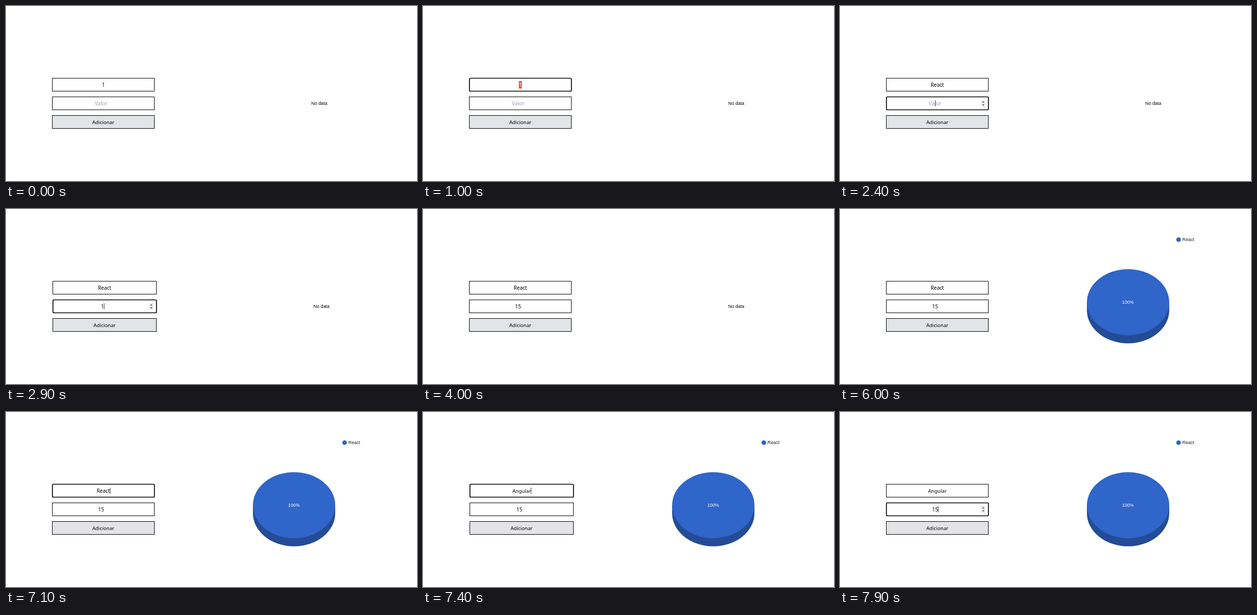
These frames come from a looping animation (794x338 px, 8 s). An HTML page:

```html
<!DOCTYPE html>
<html lang="pt">
<head>
<meta charset="utf-8">
<title>Gráfico</title>
<style>
  html, body { margin: 0; width: 100%; height: 100%; overflow: hidden; background: #fff; }
  svg { display: block; width: 794px; height: 338px; }
  .form text { font-family: "Noto Sans", "Open Sans", sans-serif; text-anchor: middle; }
  .chart text { font-family: "Liberation Sans", Arial, sans-serif; font-size: 8.8px; }
  .box { stroke: #000; fill: #fff; }
</style>
</head>
<body>
<svg viewBox="0 0 794 338">
  <g class="form">
    <rect class="box" id="box0"/>
    <rect class="box" id="box1"/>
    <rect class="box" id="box2" style="fill:#e3e4e8"/>
    <rect id="mark" fill="#e45434" y="145" height="14.4"/>
    <text id="text0" y="155.7"></text>
    <text id="text1" y="191.7"></text>
    <text id="text2" y="227.6"></text>
    <rect id="caret" width="0.8" height="12"/>
    <g id="spin">
      <rect x="272.5" y="181" width="8.5" height="14" fill="#efefef"/>
      <path d="M274.5 186.3h4.6l-2.3-2.6zM274.5 190h4.6l-2.3 2.6z" fill="#4a4a4a"/>
    </g>
  </g>
  <g class="chart" id="chart">
    <text id="empty" x="605.2" y="191" text-anchor="middle">No data</text>
    <g id="pie">
      <path d="M477 180v15.7a79.5 63.8 0 0 0 159 0v-15.7z" fill="#244c96"/>
      <ellipse cx="556.5" cy="180" rx="79.5" ry="63.8" fill="#3065c9"/>
      <text x="556.3" y="183.1" text-anchor="middle" fill="#fff">100%</text>
      <circle cx="654.1" cy="59.2" r="4.4" fill="#3065c9"/>
      <text x="661.3" y="62.3" fill="#222">React</text>
    </g>
  </g>
</svg>
<script>
const LOOP = 8000;
const SIZES = { Valor: 10.1, Adicionar: 9.6, Angular: 9.6 };
const el = id => document.getElementById(id);
const set = (node, attrs) => {
  for (const key in attrs) node.setAttribute(key, attrs[key]);
};

// Each step changes only the listed parts of the state.
const steps = [
  [0, { name: "1", value: "", focus: -1, caret: 0, mark: 0, spin: 0, wide: 0, pie: 0 }],
  [300, { spin: 1 }],
  [400, { spin: 0 }],
  [700, { focus: 0, caret: 1 }],
  [1000, { mark: 1, caret: 0 }],
  [1200, { name: "R", mark: 0, caret: 1 }],
  [1300, { name: "Rea" }],
  [1400, { name: "React" }],
  [1700, { caret: 0 }],
  [2400, { focus: 1, caret: 1, spin: 1 }],
  [2900, { value: "1", wide: 1 }],
  [3000, { wide: 0 }],
  [3500, { value: "15" }],
  [4000, { focus: -1, caret: 0, spin: 0 }],
  [4200, { pie: 1 }],
  [6300, { spin: 1 }],
  [6400, { spin: 0 }],
  [7100, { focus: 0, caret: 1 }],
  [7200, { mark: 1, caret: 0 }],
  [7400, { name: "Angular", mark: 0, caret: 1, wide: 1 }],
  [7500, { wide: 0 }],
  [7700, { caret: 0 }],
  [7900, { focus: 1, caret: 1, spin: 1 }]
];

function stateAt(time) {
  return Object.assign({}, ...steps.filter(s => s[0] <= time).map(s => s[1]));
}

function show(id, on) {
  el(id).setAttribute("visibility", on ? "visible" : "hidden");
}

function putText(i, text, x, fill) {
  const node = el("text" + i);
  if (node.textContent !== text) node.textContent = text;
  set(node, { x, fill, "font-size": SIZES[text] || 9.9 });
  return node.getComputedTextLength();
}

function draw(s) {
  const left = s.wide ? 90.5 : 89.5;
  const width = s.wide ? 200 : 197;
  const mid = left + width / 2;
  const numX = mid - 4.3;

  for (let i = 0; i < 3; i++) {
    const on = s.focus === i;
    set(el("box" + i), {
      x: left + (on ? 0.2 : 0), y: 139.5 + 36 * i, width, height: 25,
      rx: on ? 2 : 0, "stroke-width": on ? 1.7 : 1
    });
  }

  const nameW = putText(0, s.name, mid, s.mark ? "#fff" : "#000");
  const valueW = putText(1, s.value || "Valor", numX, s.value ? "#000" : "#9ca3af");
  putText(2, "Adicionar", mid, "#000");

  set(el("mark"), { x: mid - nameW / 2, width: nameW });
  set(el("caret"), s.focus === 1
    ? { x: numX + (s.value ? valueW / 2 : 0), y: 182 }
    : { x: mid + nameW / 2, y: 146 });
  set(el("spin"), { transform: `translate(${s.wide ? 4 : 0} 0)` });
  set(el("chart"), { transform: `translate(${s.wide ? 4.3 : 0} 0)` });

  show("mark", s.mark);
  show("caret", s.caret);
  show("spin", s.spin);
  show("pie", s.pie);
  show("empty", !s.pie);
}

function tick() {
  draw(stateAt(performance.now() % LOOP));
  requestAnimationFrame(tick);
}
tick();
</script>
</body>
</html>
```
